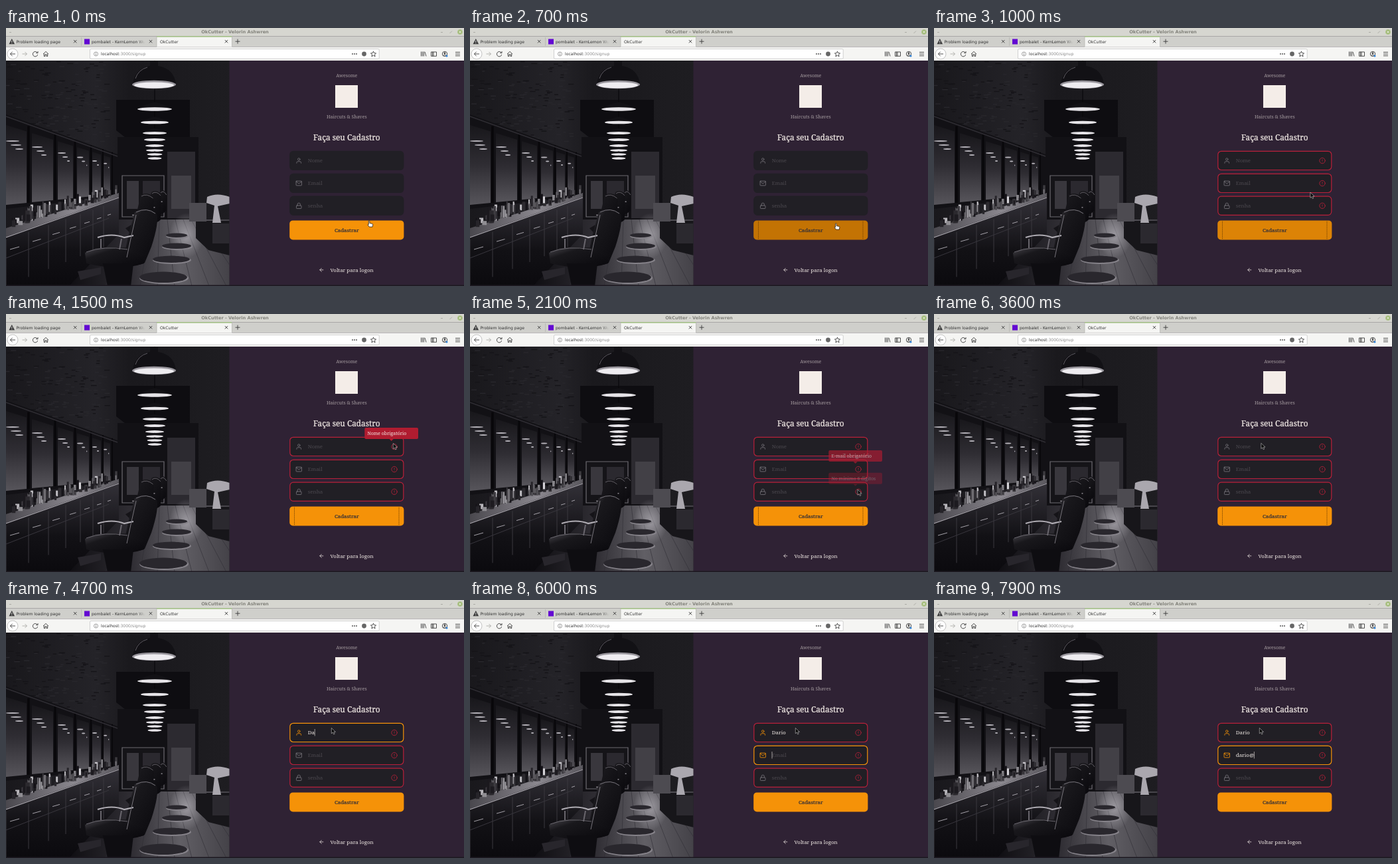
These frames come from a looping animation (690x388 px, 8000 ms). An HTML page:

```html
<!DOCTYPE html>
<html lang="pt">
<head>
<meta charset="utf-8">
<title>Cadastro</title>
<style>
html, body { margin: 0; width: 100%; height: 100%; overflow: hidden; background: #2f2234; }
svg { display: block; width: 100%; height: 100%; }
text { white-space: pre; }
.ui { font-family: "DejaVu Sans", sans-serif; font-size: 6.1px; fill: #333; }
.slab { font-family: "Noto Serif", serif; font-size: 7.9px; fill: #f4ede8; }
.strong { stroke: currentColor; stroke-width: .22; }
.mid { text-anchor: middle; }
.line { fill: none; stroke: #3c3c3c; stroke-width: .9; }
.pale { fill: none; stroke: #a3a39c; stroke-width: .8; }
.icon { fill: none; stroke: currentColor; stroke-width: 2; stroke-linecap: round; stroke-linejoin: round; }
</style>
</head>
<body>
<svg viewBox="0 0 690 388" preserveAspectRatio="none">
  <defs>
    <linearGradient id="wall" x2="1" y2="0">
      <stop stop-color="#19181c"/><stop offset=".4" stop-color="#242328"/>
      <stop offset=".55" stop-color="#1a191d"/><stop offset="1" stop-color="#1e1d21"/>
    </linearGradient>
    <linearGradient id="floor" x2="1" y2="0">
      <stop stop-color="#0d0c10"/><stop offset=".4" stop-color="#2f2d33"/>
      <stop offset=".7" stop-color="#615f65"/><stop offset="1" stop-color="#444248"/>
    </linearGradient>
    <linearGradient id="counter" x2="1" y2="0">
      <stop stop-color="#4a484e"/><stop offset=".6" stop-color="#8b888f"/><stop offset="1" stop-color="#5a585e"/>
    </linearGradient>
    <linearGradient id="drawers" x2="0" y2="1">
      <stop stop-color="#333138"/><stop offset=".6" stop-color="#121115"/><stop offset="1" stop-color="#0b0a0e"/>
    </linearGradient>
    <linearGradient id="mirror" x2="0" y2="1">
      <stop stop-color="#18171b"/><stop offset=".5" stop-color="#2f2d33"/><stop offset="1" stop-color="#57555b"/>
    </linearGradient>
    <linearGradient id="leather" x2="1" y2="1">
      <stop stop-color="#4a484e"/><stop offset=".3" stop-color="#19181c"/><stop offset="1" stop-color="#09080c"/>
    </linearGradient>
    <linearGradient id="tabFade" x2="1" y2="0">
      <stop stop-color="#cfcfcb" stop-opacity="0"/><stop offset="1" stop-color="#cfcfcb"/>
    </linearGradient>
    <radialGradient id="glow">
      <stop stop-color="#c5c2c9" stop-opacity=".6"/><stop offset="1" stop-color="#c5c2c9" stop-opacity="0"/>
    </radialGradient>
    <clipPath id="photoClip"><rect y="49" width="336.5" height="339"/></clipPath>
    <clipPath id="tabClip"><rect x="128" y="13" width="82" height="15"/></clipPath>
  </defs>

  <rect width="690" height="388" fill="#2f2234"/>
  <g id="photo" clip-path="url(#photoClip)"></g>

  <g id="browser">
    <rect width="690" height="12.5" fill="#d6d6d0"/>
    <text class="ui mid" x="345" y="8.4" style="font-size:6.6px;font-weight:700;fill:#83837c">OkCutter - Velorin Ashwren</text>
    <path class="pale" d="M5 6.500h3M655 6.500h3M668.500 8l3.500-3.500"/>
    <circle cx="684" cy="6" r="3.800" fill="#a5bd7c"/>
    <path d="M682.600 4.600l2.800 2.800m0-2.800l-2.800 2.800" stroke="#f4f4f0" stroke-width=".8"/>
    <rect y="12.500" width="690" height="16" fill="#cfcfcb"/>
    <rect x="227" y="12.500" width="113.500" height="16" fill="#f5f5f3"/>
    <rect x="227" y="12.300" width="113.500" height="1.200" fill="#8fb56a"/>
    <path d="M113.500 14v13M227 13v15M340.500 13v15" stroke="#b2b2ae" stroke-width=".7"/>
    <path d="M8.800 16l4.300 8.300h-8.600z" fill="#3c3c3c"/><path d="M8.800 19v2.500m0 .8v1" stroke="#eee" stroke-width=".9"/>
    <text class="ui" x="15.500" y="22.600">Problem loading page</text>
    <rect x="118" y="16.500" width="8" height="8" fill="#6307d2"/>
    <text class="ui" x="129" y="22.600" clip-path="url(#tabClip)">pombalet - KernLemon Wuzzo</text>
    <rect x="196" y="14" width="14" height="13" fill="url(#tabFade)"/>
    <text class="ui" x="232" y="22.600">OkCutter</text>
    <path class="line" d="M102 18l4.400 4.400m0-4.400l-4.400 4.400M215.800 18l4.400 4.400m0-4.400l-4.400 4.400M329.800 18l4.400 4.400m0-4.400l-4.400 4.400M345.500 20.200h7M349 16.700v7"/>
    <rect y="28.500" width="690" height="20.500" fill="#f5f5f3"/>
    <circle cx="10" cy="39" r="8" fill="#fff" stroke="#aaa" stroke-width=".7"/>
    <path class="line" d="M14 39H6.500m3.200-3.300L6.400 39l3.300 3.300"/>
    <path class="pale" d="M24.500 39h7m-3-3l3 3l-3 3"/>
    <path class="line" d="M47.200 37.200A3.700 3.700 0 1 0 47.700 40M48 35v2.700h-2.700"/>
    <path class="line" d="M56 39.200l4-3.800l4 3.800M57.300 38.500v4h1.700v-2.700h2v2.700h1.700v-4"/>
    <rect x="126.500" y="31.500" width="435.700" height="15" rx="1.500" fill="#fff" stroke="#c6c6c6" stroke-width=".8"/>
    <circle cx="135.500" cy="39" r="3" fill="none" stroke="#777" stroke-width=".7"/>
    <path d="M135.500 37v.8m0 .7v2.400" stroke="#777" stroke-width=".8"/>
    <text class="ui" x="143" y="41.300">localhost<tspan fill="#8a8a8a">:3000/signup</tspan></text>
    <g fill="#444"><circle cx="522" cy="39" r=".9"/><circle cx="525" cy="39" r=".9"/><circle cx="528" cy="39" r=".9"/><circle cx="539.500" cy="39" r="3.400" fill="#666"/></g>
    <path class="line" d="M553.500 35l1.200 2.700l2.900.3l-2.200 1.900l.7 2.900l-2.600-1.500l-2.600 1.500l.7-2.900l-2.200-1.900l2.900-.3z"/>
    <path class="line" d="M625.500 35.500v7m2-7v7m2-7v7m1.500-6.700l2 6.700"/>
    <path class="line" d="M640.500 36h8v6.300h-8zM642.500 36v6.300M644 36v6.300"/>
    <circle class="line" cx="661" cy="39" r="3.700"/><circle cx="661" cy="38" r="1.400" fill="#3c3c3c"/><path d="M658.500 41.500q2.500-2.600 5 0" class="line"/>
    <circle cx="664" cy="42" r="1.500" fill="#2b80d8"/>
    <path class="line" d="M677 36.400h7m-7 2.700h7m-7 2.700h7"/>
  </g>

  <g class="slab">
    <text class="mid" x="513.300" y="73.800" style="font-size:7px" opacity=".6">Awesome</text>
    <rect x="496" y="86" width="34" height="34" fill="#f4ede8"/>
    <text class="mid" x="513.300" y="136.200" style="font-size:7px" opacity=".6">Haircuts &amp; Shaves</text>
    <text class="mid strong" color="#f4ede8" x="513.300" y="168.800" style="font-size:11.800px;font-weight:500">Faça seu Cadastro</text>
    <text x="488.500" y="366.700">Voltar para logon</text>
    <g class="icon" color="#f4ede8" transform="translate(471 359.500) scale(.36)"><path d="M19 12H5m7 7l-7-7l7-7"/></g>
  </g>
  <g id="fields"></g>
  <g id="button">
    <rect id="fill" x="427.200" y="289.400" width="172.200" height="29" rx="5"/>
    <path id="dots" d="M434.500 290.500v27M592 290.500v27" stroke="#6b3d05" stroke-width=".8" stroke-dasharray="1 .6"/>
    <text class="slab mid strong" color="#312e38" x="513.300" y="306.800" style="fill:#312e38;font-weight:500">Cadastrar</text>
  </g>
  <g id="tips"></g>
  <path id="arrow" d="M0 0v8.300l2-1.800l1.400 3l1.500-.7l-1.400-2.900h2.700z" fill="#0a0a0a" stroke="#fff" stroke-width=".45"/>
  <path id="hand" d="M0 0q.9-.8 1.600 0v3.300l3.900.8q1 .3.900 1.400l-.6 3.300h-4.800l-2.500-3.300q.5-1.200 1.500 0z" fill="#fff" stroke="#111" stroke-width=".7"/>
  <rect y="386.500" width="690" height="1.500" fill="#1d1921"/>
</svg>
<script>
const $ = id => document.getElementById(id);
const ORANGE = '#f59208', RED = '#b8203a', GREY = '#77737a', FIELD = '#211f25';

function drawPhoto() {
  let seed = 11;
  const rnd = () => (seed = seed * 16807 % 2147483647) / 2147483647;
  const out = [];
  const rect = (x, y, w, h, f) => out.push(`<rect x="${x}" y="${y}" width="${w}" height="${h}" fill="${f}"/>`);
  const oval = (x, y, rx, ry, f) => out.push(`<ellipse cx="${x}" cy="${y}" rx="${rx}" ry="${ry}" fill="${f}"/>`);
  const path = (d, f, extra = '') => out.push(`<path d="${d}" fill="${f}" ${extra}/>`);
  const stroke = (d, c, w) => path(d, 'none', `stroke="${c}" stroke-width="${w}"`);

  rect(0, 49, 337, 340, 'url(#wall)');
  for (let i = 0; i < 170; i++) {
    const x = rnd() * 150, y = 50 + rnd() * (80 + x * .4);
    rect(x, y, 4 + rnd() * 5, 1.4, rnd() < .5 ? '#28272c' : '#151418');
  }
  // Back room
  path('M166 108h111v56h-98l-13-10z', '#0e0d11');
  rect(168, 164, 122, 126, '#121115');
  rect(243, 186, 42, 100, '#2c2a30'); rect(249, 222, 30, 50, '#424046');
  path('M175 222h63v62h-63z', '#151418', 'stroke="#6d6a71" stroke-width="1.2"');
  rect(182, 230, 18, 42, '#39373d'); rect(206, 230, 26, 34, '#2b292f');
  // Mirrors along the left wall
  path('M0 130L168 190V253L0 272z', '#121115');
  [[0, 31], [39, 71], [78, 101], [107, 125], [130, 143], [147, 157]].forEach(([a, b]) => {
    const top = x => 146 + x * .31, low = x => 266 - x * .1, size = 10 - a * .05;
    path(`M${a} ${top(a)}L${b} ${top(b)}V${low(b)}L${a} ${low(a)}z`, 'url(#mirror)');
    for (let k = 0; k < 3; k++) oval(a + size + k * 5, top(a) + 24 - a * .08 + k * 6, size - k * 2, 1, '#b5b2b9');
    stroke(`M${b + 3} ${top(b) - 8}V${low(b)}`, '#08070a', 4 - b * .015);
  });
  stroke('M0 133L168 193', '#2f2d33', 1.5);
  // Floor
  path('M165 288H337V388H90z', 'url(#floor)');
  for (let i = 0; i < 9; i++) stroke(`M${195 + i * 12} 288L${150 + i * 26} 388`, '#302e34', .6);
  oval(272, 312, 26, 34, 'url(#glow)');
  // Counter with drawers and bottles
  path('M0 301L170 248V257L0 322z', 'url(#counter)');
  path('M0 314L170 254V310L95 388H0z', 'url(#drawers)');
  [0, 34, 64, 90, 112, 131, 147].forEach((x, i) => {
    stroke(`M${x} ${318 - x * .34}V${388 - x * .4}`, '#3b393f', 1);
    stroke(`M${x + 6} ${333 - x * .35}l${14 - i * 1.500} ${-4 + i * .4}`, '#a5a2a9', 1);
  });
  stroke('M0 315L170 255', '#a5a2a9', 1.2);
  stroke('M0 346L155 286', '#38363d', 1);
  for (let i = 0; i < 90; i++) {
    const x = rnd() * 165, h = 4 + rnd() * (24 - x * .1), g = 20 + rnd() ** 2 * 200 | 0;
    rect(x, 303 - x * .3 - rnd() * 8 - h, 1.5 + rnd() * (6 - x * .02), h, `rgb(${g},${g - 2},${g + 3})`);
  }
  // Right side furniture
  path('M286 290h51v52l-32-8l-19-18z', '#17161a');
  path('M303 254q15-7 34 0v10l-18 4l5 25h-13l3-26l-12-4z', '#aaa7ae');
  rect(276, 263, 26, 28, '#4d4b51'); rect(311, 294, 26, 30, '#2b292f');
  // Chair bases, far chairs, near chair
  [[258, 313, 17, 4], [258, 329, 23, 5], [250, 349, 29, 6], [238, 376, 37, 9]].forEach(([x, y, a, b]) => {
    oval(x, y, a, b, '#858289'); oval(x - 1, y - 1.200, a - 1, b - .8, '#29272d');
  });
  [[232, 246, .4], [219, 247, .6], [203, 251, .8]].forEach(([x, y, s]) => {
    path(`M${x} ${y}q${12 * s}-5 ${25 * s} 3l${-2 * s} ${64 * s}q${-16 * s} 9 ${-43 * s} 3l${-9 * s}-7l${17 * s}-8z`, 'url(#leather)');
    stroke(`M${x + 1} ${y + 2}q${10 * s}-5 ${22 * s} 3`, '#69666d', .9);
    stroke(`M${x - 16 * s} ${y + 38 * s}h${25 * s}`, '#9a979e', 1.4);
  });
  path('M194 277q18-10 33 2q4 13-8 50l-10 24q-16 8-33-1l10-47z', 'url(#leather)');
  stroke('M196 277q16-8 29 2', '#77747b', 1);
  path('M119 338q22-12 65-7l24 12v11q-36 12-87 0z', 'url(#leather)');
  path('M146 354h46l-4 34h-35z', '#0e0d11');
  path('M108 366l35-6v10l-31 9z', '#28262c');
  stroke('M121 337q26-10 62-4', '#69666d', 1);
  stroke('M138 315q22-7 40 0l14-3', '#b0adb4', 2.2);
  stroke('M143 317v14M174 317l-3 16', '#69666d', 2);
  stroke('M196 281q-8 35-14 64', '#77747b', 1);
  // Pendant lamps
  stroke('M224 49V190', '#09080b', 1.2);
  path('M191 84Q194 61 217 57V50h12v7q24 4 27 27z', '#121115');
  stroke('M195 76q4-13 18-17', '#5d5a61', 1);
  oval(223, 85, 33, 6.200, '#99969d'); oval(223, 86, 30, 4.600, '#eeecf0');
  [[122, 26, 2.700], [142, 21, 2.300], [158, 18, 2.100], [168, 16, 2], [177, 14, 1.900], [184, 13, 1.800], [190, 11.500, 1.800], [196, 10.500, 1.700]].forEach(([y, rx, ry]) => {
    path(`M${224 - rx} ${y}Q${224 - rx * .6} ${y - rx * .3} 224 ${y - rx * .4}Q${224 + rx * .6} ${y - rx * .3} ${224 + rx} ${y}z`, '#121115');
    oval(224, y, rx, ry, '#e6e4e8');
  });
  $('photo').innerHTML = out.join('');
}

const ALERT = '<circle cx="12" cy="12" r="10"/><path d="M12 8v4m0 4v.1"/>';
const icon = (x, y, color, shape) =>
  `<g class="icon" color="${color}" transform="translate(${x} ${y}) scale(.42)">${shape}</g>`;

const FIELDS = [
  { hint: 'Nome', y: 185, tip: 'Nome obrigatório', show: [1200, 1700],
    shape: '<circle cx="12" cy="7" r="4"/><path d="M20 21v-2a4 4 0 0 0-4-4H8a4 4 0 0 0-4 4v2"/>',
    word: 'Dario', keys: [4500, 4700, 4900, 5000, 5200], focus: [3800, 5400] },
  { hint: 'Email', y: 219, tip: 'E-mail obrigatório', show: [1700, 2000],
    shape: '<rect x="2" y="4" width="20" height="16" rx="2"/><path d="M22 6l-10 7L2 6"/>',
    word: 'dario@', keys: [6400, 6500, 6700, 6900, 7100, 7700], focus: [5400, 8000] },
  { hint: 'senha', y: 252.8, tip: 'No mínimo 6 dígitos', show: [2000, 2400],
    shape: '<rect x="3" y="11" width="18" height="11" rx="2"/><path d="M7 11V7a5 5 0 0 1 10 0v4"/>',
    word: '', keys: [], focus: [8000, 8000] },
];

function buildForm() {
  const group = parent => $(parent).appendChild(document.createElementNS('http://www.w3.org/2000/svg', 'g'));
  FIELDS.forEach(f => {
    const field = group('fields');
    field.innerHTML = `<rect x="427.800" y="${f.y + .3}" width="171" height="28.200" rx="5" fill="${FIELD}" stroke-width="1.200"/>
      ${icon(436.200, f.y + 9.500, GREY, f.shape)}
      <text class="slab" x="454.800" y="${f.y + 17.200}"></text>
      <path stroke="#f4ede8" stroke-width=".6"/>
      ${icon(580, f.y + 9.500, RED, ALERT)}`;
    [f.box, f.icon, f.text, f.caret, f.alert] = field.children;
    f.bubble = group('tips');
    f.bubble.innerHTML = `<rect x="540.300" y="${f.y - 14}" width="80.700" height="17" rx="2" fill="#b01c30"/>
      <path d="M577.600 ${f.y + 3}h6l-3 3z" fill="#b01c30"/>
      <text class="slab" x="544.500" y="${f.y - 3}" style="font-size:6.950px">${f.tip}</text>`;
  });
}

// time, x, y of the pointer tip
const POINTER = [
  [0, 546.3, 290.3], [400, 550.5, 294.3], [800, 550.5, 294.3], [1200, 583.3, 200], [1400, 583.3, 194.5],
  [1600, 583.3, 194.5], [1800, 584, 230], [1900, 584, 230], [2100, 584, 264], [2300, 584, 264],
  [2700, 514.3, 209.5], [3200, 514.3, 209.5], [3700, 490.3, 192.5], [8000, 490.3, 192.5],
];

const ramp = (t, from, to) => Math.min(1, Math.max(0, (t - from) / (to - from)));
const within = (t, [from, to]) => t >= from && t < to;
const show = (node, on) => { node.style.display = on ? '' : 'none'; };

function pointerAt(t) {
  const i = Math.max(1, POINTER.findIndex(p => p[0] >= t));
  const [t0, x0, y0] = POINTER[i - 1], [t1, x1, y1] = POINTER[i];
  const k = ramp(t, t0, t1), e = k * k * (3 - 2 * k);
  return [x0 + (x1 - x0) * e, y0 + (y1 - y0) * e];
}

function render(t) {
  const [x, y] = pointerAt(t), onButton = y > 288;
  $('arrow').setAttribute('transform', `translate(${x} ${y})`);
  $('hand').setAttribute('transform', `translate(${x} ${y})`);
  show($('arrow'), !onButton);
  show($('hand'), onButton);

  const hover = ramp(t, 0, 300) - ramp(t, 900, 1100);
  $('fill').setAttribute('fill', `rgb(${245 - 50 * hover},${146 - 31 * hover},${8 - 4 * hover})`);
  show($('dots'), within(t, [600, 3800]));

  const invalid = t >= 800;
  FIELDS.forEach(f => {
    const count = f.keys.filter(k => k <= t).length;
    const focused = within(t, f.focus);
    f.box.setAttribute('stroke', focused ? ORANGE : invalid ? RED : FIELD);
    f.icon.setAttribute('color', focused || count ? ORANGE : GREY);
    f.text.textContent = count ? f.word.slice(0, count) : f.hint;
    f.text.style.fill = count ? '#f4ede8' : '#4c494f';
    const caretX = 455 + (count ? f.text.getComputedTextLength() : 0);
    f.caret.setAttribute('d', `M${caretX} ${f.y + 9}v10.500`);
    show(f.caret, focused);
    show(f.alert, invalid);
    const [from, to] = f.show;
    f.bubble.style.opacity = ramp(t, from, from + 300) * (1 - ramp(t, to, to + 300));
  });
}

drawPhoto();
buildForm();
const start = performance.now();
function tick() {
  const t = (performance.now() - start) % 8000;
  render(Math.floor(t / 100) * 100);
  requestAnimationFrame(tick);
}
tick();
</script>
</body>
</html>
```
